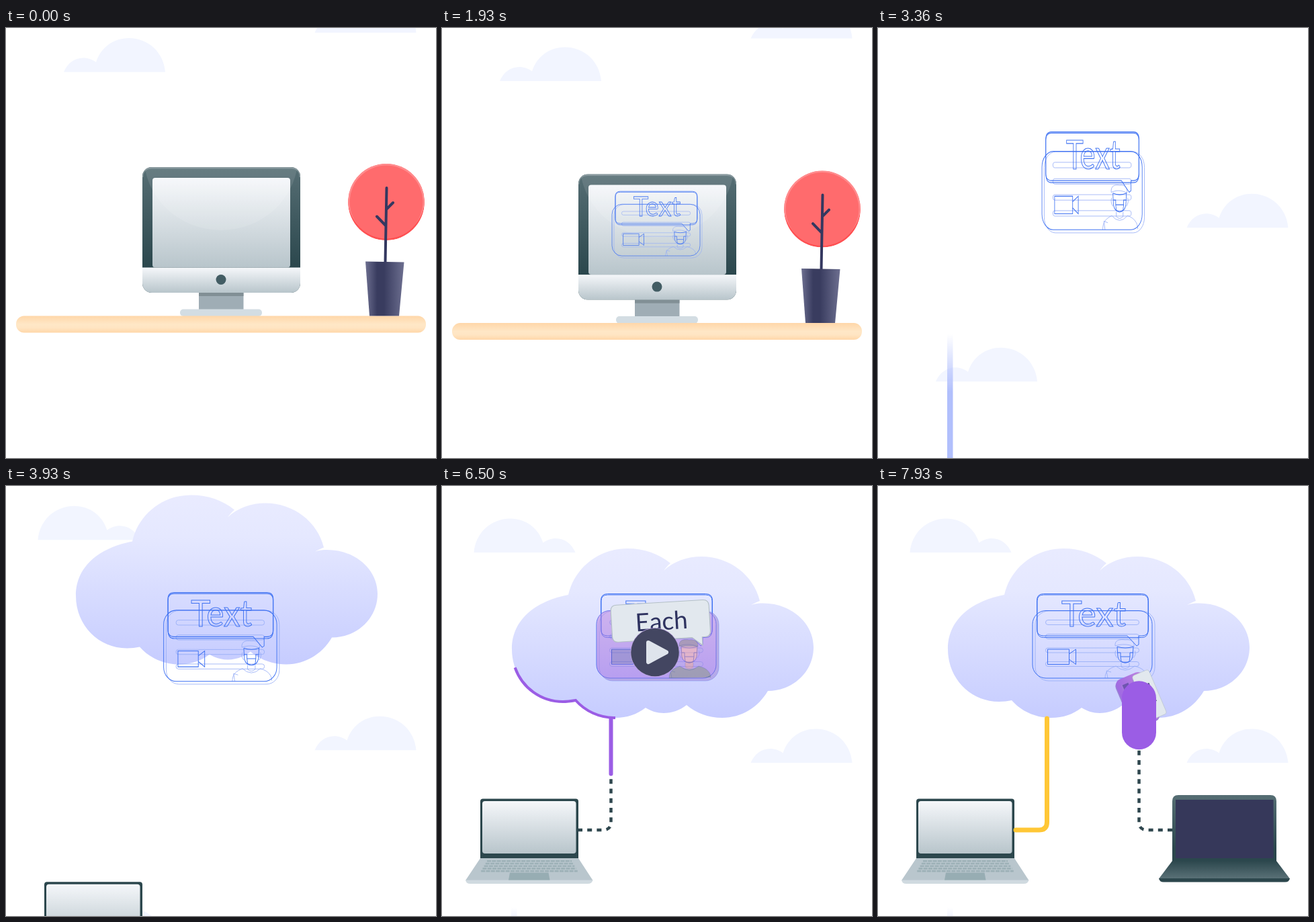
Write an HTML page that moves like this. It is 640 px wide and 640 px high and loops after 8 s.

```html
<!DOCTYPE html>
<html lang="en">
<head>
<meta charset="utf-8">
<title>Video to the cloud</title>
<style>
  html, body { margin: 0; height: 100%; overflow: hidden; background: #fff; }
  svg { display: block; width: 100%; height: 100%; }
  text { font-family: Lato, sans-serif; }
  #wire { fill: none; stroke: #3f72f2; }
  #wire .soft { stroke: #93abf6; stroke-width: .8; }
</style>
</head>
<body>
<svg viewBox="0 0 640 640">
  <defs>
    <linearGradient id="bezel" x2="0" y2="1"><stop stop-color="#566e74"/><stop offset=".8" stop-color="#2b474d"/></linearGradient>
    <linearGradient id="glass" x2="0" y2="1"><stop stop-color="#f5f7fa"/><stop offset="1" stop-color="#b8c5cb"/></linearGradient>
    <linearGradient id="wood" x2="0" y2="1"><stop stop-color="#ffd7a9"/><stop offset=".5" stop-color="#ffe7c6"/><stop offset=".7" stop-color="#ffe5c3"/><stop offset="1" stop-color="#ffd7a9"/></linearGradient>
    <linearGradient id="clay"><stop stop-color="#6d6f90"/><stop offset=".3" stop-color="#393c5f"/><stop offset=".48" stop-color="#393c5f"/><stop offset="1" stop-color="#6d6f90"/></linearGradient>
    <linearGradient id="sky" x2="0" y2="1"><stop stop-color="#e9ebff"/><stop offset=".25" stop-color="#e5e8ff"/><stop offset="1" stop-color="#c6ccff"/></linearGradient>
    <linearGradient id="fade" x2="0" y2="1"><stop stop-color="#b1bffc" stop-opacity="0"/><stop offset=".4" stop-color="#b1bffc"/><stop offset="1" stop-color="#b1bffc"/></linearGradient>
    <linearGradient id="darkBase" x2="0" y2="1"><stop stop-color="#2c474d"/><stop offset="1" stop-color="#5a7177"/></linearGradient>
    <linearGradient id="violet" x2="0" y2="1"><stop stop-color="#bd83e0"/><stop offset="1" stop-color="#a06ae2"/></linearGradient>
    <clipPath id="monitorShape"><rect x="203" y="207" width="235" height="187" rx="14"/></clipPath>
    <clipPath id="treeShape"><circle cx="566" cy="259" r="57"/></clipPath>
    <path id="puff" fill="#f2f5ff" d="M86 65.5C91 53 102 44.5 115 44.5C122 44.5 129 47 134 51C141 29 160 15 183 15C212 15 235 37 237 65.5Z"/>
    <path id="cloudShape" pathLength="1" d="M258 345C234 345 213 335 199 319C193 320 187 321 180 321C138 321 104 287 104 243C104 195 145 170 188 162C197 122 233 93 276 93C301 93 323 101 340 115C336 118 333 122 330 126C345 112 365 105 386 105C428 105 464 133 473 171C468 173 464 175 460 177C466 175 472 174.5 478 174.5C520 174.5 553 204 553 240C553 276 523 305 485 305C471 329 446 345 417 345C397 345 378 338 364 326C354 334 342 338 330 338C320 338 311 335 303 330C290 340 275 345 258 345Z"/>
  </defs>

  <use href="#puff" id="puffA"/>
  <use href="#puff" id="puffB"/>
  <use href="#puff" id="puffC"/>
  <rect id="streak" x="103" width="8.5" height="215" fill="url(#fade)"/>

  <g id="desk">
    <rect x="287" y="394" width="66.500" height="25" fill="#9fadb5"/>
    <rect x="287" y="394" width="66.500" height="5" fill="#818f95"/>
    <rect x="259" y="418.500" width="122" height="10.500" rx="5" fill="#d3dde3"/>
    <g clip-path="url(#monitorShape)">
      <rect x="203" y="207" width="235" height="187" fill="url(#bezel)"/>
      <path d="M203 222Q203 208 217 208H424Q438 208 438 222" fill="none" stroke="#7d8f94" stroke-width="3"/>
      <rect x="203" y="356.500" width="235" height="37.500" fill="url(#glass)"/>
      <rect x="218" y="223" width="205" height="133.500" rx="4" fill="url(#glass)"/>
      <ellipse cx="320" cy="190" rx="115" ry="111" fill="#fff" opacity=".1"/>
    </g>
    <circle cx="320" cy="374.500" r="7.500" fill="#435d64"/>
    <rect x="15" y="428.500" width="610" height="25" rx="12" fill="url(#wood)"/>
    <g clip-path="url(#treeShape)">
      <circle cx="566" cy="259" r="57" fill="#ff5052"/>
      <circle cx="566" cy="255" r="57" fill="#ff8c8e"/>
      <circle cx="566" cy="259" r="54.500" fill="#ff6b6d"/>
    </g>
    <path d="M566.500 238L564.500 349M567 269L576 260M552 280.500L565 294" fill="none" stroke="#343860" stroke-width="4" stroke-linecap="round"/>
    <path d="M535 347.500L592.500 348.500L585 428.500H541Z" fill="url(#clay)"/>
  </g>

  <g id="laptopA">
    <rect x="57" y="465.500" width="146" height="92" rx="4" fill="#2c474d"/>
    <rect x="60" y="469" width="139.500" height="78" rx="4" fill="url(#glass)"/>
    <path d="M57 554H203L224.500 587H35Z" fill="#b9c6cd"/>
    <path d="M35 586.500H224.500Q223 592 217 592H42Q36 592 35 586.500Z" fill="#d0dae0"/>
    <g id="keyboard" stroke="#9db1b7" stroke-width="2.600" stroke-dasharray="6 1.300"/>
    <path d="M101 575.500H158.500L160.500 586.500H99Z" fill="#97adb3"/>
  </g>

  <g fill="none" stroke="#2f474e" stroke-width="4.500">
    <path id="dashA" d="M202 512H240Q251.500 512 251.500 500V345"/>
    <path id="dashB" d="M438 512H400Q388.500 512 388.500 500V345"/>
  </g>

  <use href="#cloudShape" id="cloud" fill="url(#sky)"/>
  <g id="signals" fill="none"></g>
  <g id="wire"></g>

  <g id="content">
    <g id="card">
      <rect x="234" y="186" width="178" height="104" rx="20" fill="#9a7fd6"/>
      <rect x="230" y="185" width="178" height="101" rx="20" fill="url(#violet)"/>
      <g id="cardBars" fill="#a57bdd"></g>
      <path d="M252 243H284V250L295 243V265L284 258V265H252Z" fill="#6f55b0"/>
      <path d="M338 286C338 276 343 272 354 268Q368 277 382 268C394 271 400 277 400 285Z" fill="#6f6570"/>
      <path d="M362 258H374V270Q368 275 362 270Z" fill="#d9808a"/>
      <path d="M356 236L355.500 250C356 266 380 266 380.500 250V236Z" fill="#ee8f98"/>
      <path d="M353 239C352 228 360 228 368 229C376 228 382 231 381 239Z" fill="#7b5a78"/>
    </g>
    <g id="bubble">
      <path d="M246.500 160.500H392.500Q402.500 160.500 402.500 170.500V213Q402.500 223 392.500 223H388V237L371 223H246.500Q236.500 223 236.500 213V170.500Q236.500 160.500 246.500 160.500Z" fill="#e2e8ee" stroke="#b4c0c6" stroke-width="1.300"/>
      <text x="321" y="207" font-size="42" text-anchor="middle" fill="#2f3360">Each</text>
    </g>
    <g id="play">
      <circle r="36.500" fill="#b9a3dd"/>
      <circle r="35.700" fill="#434661"/>
      <path d="M-10 -14.500L17 0L-10 14.500Z" fill="#dfe4ec" stroke="#dfe4ec" stroke-width="6" stroke-linejoin="round"/>
    </g>
  </g>
  <rect id="capsule" x="-25.500" y="-51" width="51" height="102" rx="25.500" fill="#9b5de5"/>

  <g id="laptopB">
    <path d="M438 560V469Q438 460 447 460H584Q593 460 593 469V560Z" fill="url(#bezel)"/>
    <rect x="443" y="467" width="145.500" height="87" fill="#36385a"/>
    <path d="M438 558H593L613 584.500H418Z" fill="url(#darkBase)"/>
    <path d="M418 584H613Q612 589.500 606 589.500H425Q419 589.500 418 584Z" fill="#2c464c"/>
  </g>
</svg>

<script>
const LOOP = 8000;
const OUTLINE = 1210, CABLE = 223;
const $ = id => document.getElementById(id);
const clamp = x => Math.min(1, Math.max(0, x));
const linear = u => u;
const smooth = u => u * u * (3 - 2 * u);

// Sine ease in and out from 0 to 1.
const glide = (t, start, duration) => Math.sin(Math.PI / 2 * clamp((t - start) / duration)) ** 2;

// Value at time t on a list of [time, value] keys.
function track(t, keys, ease = linear) {
  const next = keys.findIndex(k => k[0] > t);
  if (next === 0) return keys[0][1];
  if (next < 0) return keys[keys.length - 1][1];
  const [t0, v0] = keys[next - 1], [t1, v1] = keys[next];
  return v0 + (v1 - v0) * ease((t - t0) / (t1 - t0));
}

const move = (id, transform) => $(id).setAttribute('transform', transform);
const shift = (id, x, y) => move(id, `translate(${x} ${y})`);
const show = (el, visible) => el.setAttribute('visibility', visible ? 'visible' : 'hidden');

function trim(el, from, to) {
  show(el, to > from);
  el.setAttribute('stroke-dasharray', `${Math.max(0, to - from)} 9`);
  el.setAttribute('stroke-dashoffset', -from);
}

function revealDashes(el, length) {
  const dash = 7, period = 14.2, whole = Math.floor(length / period);
  show(el, length > 0);
  el.setAttribute('stroke-dasharray',
    '7 7.2 '.repeat(whole) + `${Math.min(dash, length - whole * period)} 999`);
}

const roundRect = (x, y, w, h, r) =>
  `M${x + r} ${y}h${w - 2 * r}a${r} ${r} 0 0 1 ${r} ${r}v${h - 2 * r}a${r} ${r} 0 0 1 ${-r} ${r}` +
  `h${2 * r - w}a${r} ${r} 0 0 1 ${-r} ${-r}v${2 * r - h}a${r} ${r} 0 0 1 ${r} ${-r}z`;

const bars = [199.5, 220.5, 241, 261.5].map(y => roundRect(249.5, y, 139, 7, 3.5));
const softLines = [
  roundRect(234, 186, 178, 104, 20),
  ...bars,
  'M353 238C352 229 360 228 368 229C376 228 382 231 381 239C372 235 362 235 353 238',
  'M354 245Q351 250 356 256M382 245Q385 250 380 256',
  'M362 263V269Q368 274 374 269V263',
  'M338 286C338 276 343 272 354 268Q368 280 382 268C394 271 400 277 400 285',
  'M342 286L340 275L347 277'
];
const strongLines = [
  roundRect(230, 185.500, 178, 100.500, 20),
  'M246.500 160.500H392.500Q402.500 160.500 402.500 170.500V213Q402.500 223 392.500 223H388V236L385 238L371 223H246.500Q236.500 223 236.500 213V170.500Q236.500 160.500 246.500 160.500Z',
  'M246.500 162H392.500Q402 162 402 171V215Q402 225.500 392.500 225.500H246.500Q237 225.500 237 215V171Q237 162 246.500 162Z',
  'M252.500 243H284.500V265.500H252.500Z',
  'M284.500 250L294.500 243V265.500L284.500 258',
  'M356 239L357 254Q359 263 368 263Q377 263 379 254L380 239Q368 243 356 239',
  'M357 248H361V254H375V248H379M361 254L362 261Q368 265 374 261L375 254'
];
const pathTags = (list, attributes) => list.map(d => `<path d="${d}" ${attributes}/>`).join('');
$('wire').innerHTML = pathTags(softLines, 'class="soft" pathLength="1"') +
  pathTags(strongLines, 'pathLength="1"') +
  '<text x="273" y="208.500" font-size="52">Text</text>';
$('cardBars').innerHTML = pathTags(bars, '');
const wirePaths = [...document.querySelectorAll('#wire path')];
const wireText = document.querySelector('#wire text');

$('keyboard').innerHTML = [0, 1, 2, 3, 4].map(i =>
  `<path d="M${67 - 2.2 * i} ${558.3 + 3.7 * i}H${193 + 2.2 * i}"/>`).join('');

const signals = [
  { color: '#9b5de5', width: 6,
    head: [[6070, 0], [6500, OUTLINE + 87], [6600, OUTLINE + CABLE]],
    tail: [[6150, 0], [6500, OUTLINE - 179], [6800, OUTLINE + CABLE]] },
  { color: '#ffc736', width: 7,
    head: [[6950, 0], [7600, OUTLINE], [7880, OUTLINE + CABLE]],
    tail: [[7100, 0], [7700, 1130], [7900, OUTLINE]] }
];
$('signals').innerHTML = signals.map(s => `<g stroke="${s.color}">
  <use href="#cloudShape" stroke-width="4"/>
  <path pathLength="1" stroke-width="${s.width}" stroke-linecap="round" d="M251.500 346V500Q251.500 512 240 512H205"/></g>`).join('');
signals.forEach((s, i) => [s.outline, s.cable] = $('signals').children[i].children);

function drawScroll(t) {
  const far = glide(t, 1690, 2600), near = glide(t, 1762, 2600);
  shift('puffA', 0, 643 * far);
  shift('puffB', 373.5, 346.5 - 405 * (1 - far));
  move('puffC', `translate(284.500 ${33.5 - 405 * (1 - far)}) scale(-1 1)`);
  shift('desk', 0, 1022 * near);
  shift('cloud', 0, -1200 * (1 - near));
  shift('laptopA', 0, 363 * (1 - glide(t, 2363, 2600)));
  $('streak').setAttribute('y', 627 - 4.2e-4 * Math.max(0, 4000 - t) ** 2);
}

function drawWire(t) {
  const drawn = clamp((t - 40) / 1690);
  wirePaths.forEach(p => trim(p, 0, drawn));
  show(wireText, drawn > 0);
  wireText.setAttribute('stroke-dasharray', drawn < 1 ? `${drawn * 190} 400` : 'none');
  const at = (a, b, c, d) => track(t, [[1930, a], [2570, b], [3360, c], [4290, d]], smooth);
  move('wire', `translate(${at(320, 320, 320.3, 321)} ${at(292.5, 292.5, 229.5, 225)})
    scale(${at(.736, .648, .838, 1)} ${at(.765, 1.023, 1.16, 1)}) translate(-321 -225)`);
}

function drawSignals(t) {
  for (const s of signals) {
    const head = track(t, s.head), tail = track(t, s.tail);
    const onOutline = x => clamp((OUTLINE - x) / OUTLINE);
    const onCable = x => clamp((x - OUTLINE) / CABLE);
    trim(s.outline, onOutline(head), onOutline(tail));
    trim(s.cable, onCable(tail), onCable(head));
  }
}

function drawContent(t) {
  show($('content'), t > 6200);
  $('card').setAttribute('opacity', track(t, [[6300, 0], [6500, .5], [6700, 1]]));
  move('bubble', `translate(388 237) rotate(${track(t, [[6200, -14], [6500, -3.5], [6620, 0]])})
    scale(${track(t, [[6200, 0], [6500, .88], [6620, 1]])}) translate(-388 -237)`);
  move('play', `translate(317 247.500) scale(${track(t, [[6200, 0], [6450, 1]], smooth)})`);
  const out = smooth(clamp((t - 7620) / 300));
  move('content', `translate(${321 + 70 * out} ${225 + 92 * out}) rotate(${67 * out})
    scale(${1 - .57 * out}) translate(-321 -225)`);
  const pop = smooth(clamp((t - 7650) / 240));
  show($('capsule'), pop > 0);
  move('capsule', `translate(388.500 341.300) scale(${pop})`);
}

function draw(t) {
  drawScroll(t);
  drawWire(t);
  revealDashes($('dashA'), 210 * clamp((t - 5180) / 800));
  revealDashes($('dashB'), 210 * clamp((t - 7050) / 640));
  drawSignals(t);
  drawContent(t);
  shift('laptopB', 2.9e-4 * Math.max(0, 7930 - t) ** 2, 0);
}

const begin = performance.now();
function frame() {
  draw((performance.now() - begin) % LOOP);
  requestAnimationFrame(frame);
}
frame();
</script>
</body>
</html>
```
